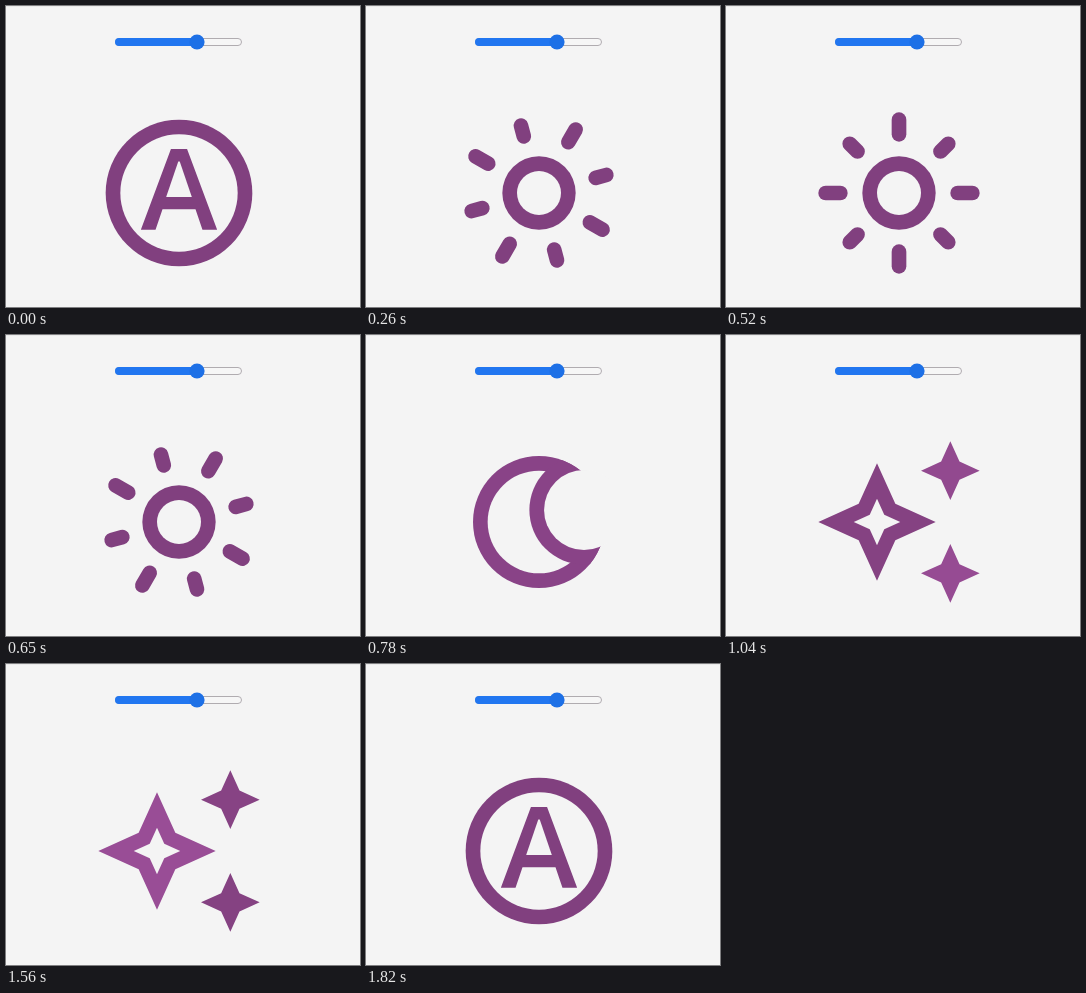
Animation, 354 px wide and 301 px high, one loop 2080 ms. Source, as an HTML page with a canvas:

```html
<!DOCTYPE html>
<html lang="en">
<head>
<meta charset="utf-8">
<title>Icon cycle</title>
<style>
  html, body { margin: 0; width: 100%; height: 100%; overflow: hidden; background: #f4f4f4; }
  canvas { display: block; width: 354px; height: 301px; }
</style>
</head>
<body>
<canvas id="stage"></canvas>
<script>
const W = 354, H = 301, TICK = 130, LOOP = 2080;
const BG = '#f4f4f4', BLUE = '#2176f0', PLUM = '#81407f', MOON = '#894387';
const UNIT = 22 / 3; // icons use a 24-unit grid
const TAU = Math.PI * 2;

const canvas = document.getElementById('stage');
const ratio = window.devicePixelRatio || 1;
canvas.width = W * ratio;
canvas.height = H * ratio;
const ctx = canvas.getContext('2d');

function disc(x, y, r, color) {
  ctx.fillStyle = color;
  ctx.beginPath();
  ctx.arc(x, y, r, 0, TAU);
  ctx.fill();
}

function poly(points, color) {
  ctx.fillStyle = color;
  ctx.beginPath();
  points.forEach(([x, y]) => ctx.lineTo(x, y));
  ctx.closePath();
  ctx.fill();
}

function pill(x, y, w, h) {
  ctx.beginPath();
  ctx.roundRect(x, y, w, h, h / 2);
}

function slider() {
  ctx.fillStyle = '#f6f6f6';
  ctx.strokeStyle = '#b0acb0';
  ctx.lineWidth = 1;
  pill(109.5, 32.5, 126, 7);
  ctx.fill();
  ctx.stroke();
  ctx.fillStyle = BLUE;
  pill(109, 32, 86, 8);
  ctx.fill();
  disc(191, 36, 7.6, '#1d70e6');
}

function auto() {
  disc(0, 0, 10, PLUM);
  disc(0, 0, 8, BG);
  poly([[-1.1, -6], [1.1, -6], [5.2, 5], [3.2, 5], [2.25, 2.2],
        [-2.25, 2.2], [-3.2, 5], [-5.2, 5]], PLUM);
  poly([[-0.1, -4.3], [0.1, -4.3], [1.75, 0.55], [-1.75, 0.55]], BG);
}

function sun(step) {
  disc(0, 0, 5, PLUM);
  disc(0, 0, 3, BG);
  ctx.rotate((step + 1) * Math.PI / 6);
  ctx.strokeStyle = PLUM;
  ctx.lineWidth = 2;
  ctx.lineCap = 'round';
  for (let i = 0; i < 8; i++) {
    ctx.beginPath();
    ctx.moveTo(8, 0);
    ctx.lineTo(i % 2 ? 9.5 : 10, 0);
    ctx.stroke();
    ctx.rotate(TAU / 8);
  }
}

function moon() {
  const x = 6.14, y = -1.64;
  disc(0, 0, 9, MOON);
  ctx.clip();
  disc(0, 0, 7, BG);
  disc(x, y, 7.45, MOON);
  ctx.restore();
  ctx.save();
  center();
  disc(x, y, 5.45, BG);
}

function star(x, y, tip, notch, color) {
  const points = [];
  for (let i = 0; i < 4; i++) {
    const c = Math.round(Math.cos(i * TAU / 4)), s = Math.round(Math.sin(i * TAU / 4));
    points.push([x + tip * c, y + tip * s]);
    points.push([x + notch * (c - s), y + notch * (s + c)]);
  }
  poly(points, color);
}

function shade(step, phase) {
  const k = 0.5 - 0.5 * Math.cos(TAU * (step / 6 + phase));
  const mix = (a, b) => Math.round(a + (b - a) * k);
  return `rgb(${mix(133, 159)},${mix(66, 80)},${mix(130, 156)})`;
}

function stars(step) {
  star(-3, 0, 8, 2.5, shade(step, 0));
  star(-3, 0, 3.17, 0.99, BG);
  star(7, -7, 4, 1.25, shade(step, 0.25));
  star(7, 7, 4, 1.25, shade(step, 0.3));
}

function center() {
  ctx.translate(173, 187);
  ctx.scale(UNIT, UNIT);
}

function draw(time) {
  const tick = Math.floor((time % LOOP) / TICK);
  ctx.setTransform(ratio, 0, 0, ratio, 0, 0);
  ctx.fillStyle = BG;
  ctx.fillRect(0, 0, W, H);
  ctx.fillStyle = '#e9e9e9';
  ctx.fillRect(0, 0, W, 1);
  slider();
  ctx.save();
  center();
  if (tick < 2 || tick >= 14) auto();
  else if (tick < 6) sun(tick - 2);
  else if (tick < 8) moon();
  else stars(tick - 8);
  ctx.restore();
}

let start;
function frame(now) {
  start ??= now;
  draw(now - start);
  requestAnimationFrame(frame);
}
draw(0);
requestAnimationFrame(frame);
</script>
</body>
</html>
```
